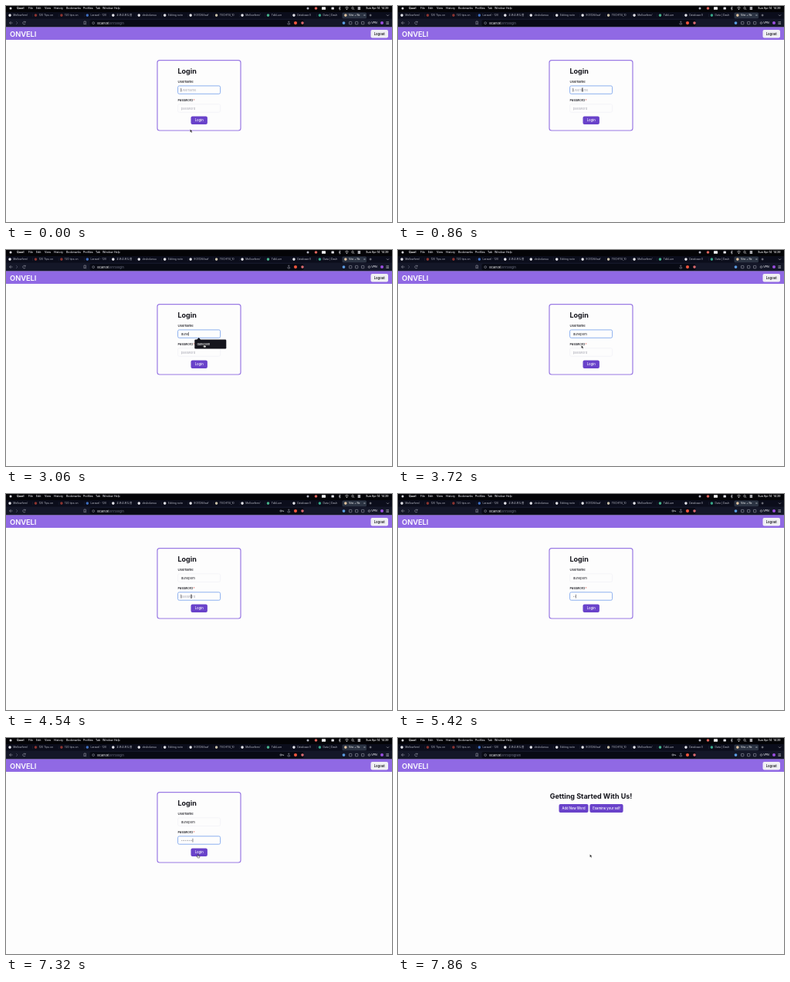
Recreate the animation shown at these times as an HTML page. Size 500x281 px, loop 8 s.

```html
<!DOCTYPE html>
<html lang="en">
<head>
<meta charset="utf-8">
<title>Login</title>
<style>
  html, body { margin: 0; width: 100%; height: 100%; overflow: hidden; background: #fdfdfd; }
  svg { display: block; width: 100vw; height: 100vh; }
  text { font-family: Inter, "Noto Sans CJK JP", "Noto Sans CJK", sans-serif; white-space: pre; }
</style>
</head>
<body>
<svg id="stage" viewBox="0 0 500 281" preserveAspectRatio="none"></svg>
<script>
const LOOP = 8000;
const INK = '#15151c', WHITE = '#fdfdfd', PURPLE = '#6942ca', PLACEHOLDER = '#a9a9b4';
const LIGHT = '#e4e4ea', GREY = '#b4b6c2';
const USER = 'dunepom';
const stage = document.getElementById('stage');

function add(parent, tag, attrs, content) {
  const el = document.createElementNS('http://www.w3.org/2000/svg', tag);
  for (const key in attrs) el.setAttribute(key, attrs[key]);
  if (content !== undefined) el.textContent = content;
  parent.appendChild(el);
  return el;
}
const group = (parent = stage) => add(parent, 'g', {});
const box = (parent, x, y, width, height, fill, more) =>
  add(parent, 'rect', { x, y, width, height, fill, ...more });
const dot = (parent, cx, cy, r, fill) => add(parent, 'circle', { cx, cy, r, fill });
const ring = (parent, cx, cy, r, stroke) =>
  add(parent, 'circle', { cx, cy, r, fill: 'none', stroke, 'stroke-width': 0.5 });
const label = (parent, x, y, size, fill, content, weight = 400, anchor = 'start') =>
  add(parent, 'text', { x, y, fill, 'font-size': size, 'font-weight': weight, 'text-anchor': anchor }, content);
const line = (parent, d, stroke, width = 0.5) =>
  add(parent, 'path', { d, stroke, 'stroke-width': width, fill: 'none' });
const show = (el, on) => el.setAttribute('visibility', on ? 'visible' : 'hidden');

function button(parent, x, y, width, height, content, fill = PURPLE, ink = '#fff', weight = 500) {
  box(parent, x, y, width, height, fill, { rx: 2 });
  label(parent, x + width / 2, y + height / 2 + 1.5, 4.2, ink, content, weight, 'middle');
}

function menuBar() {
  const g = group();
  box(g, 0, 0, 500, 8, '#040407');
  dot(g, 6, 3, 1.5, LIGHT);
  label(g, 14, 4.3, 3.5, '#fff', 'Quorl', 700);
  const items = [['File', 29], ['Edit', 39], ['View', 50], ['History', 62], ['Bookmarks', 78],
    ['Profiles', 100], ['Tab', 116], ['Window', 125], ['Help', 140]];
  for (const [name, x] of items) label(g, x, 4.3, 3.5, LIGHT, name, 500);
  dot(g, 391, 3, 1.5, GREY);
  dot(g, 401.5, 3, 1.8, '#e0655c');
  box(g, 409, 1.2, 5, 3.6, '#fff', { rx: 0.5 });
  box(g, 421.5, 1.4, 3.4, 3.2, LIGHT, { rx: 0.5 });
  line(g, 'M431 2l2.4 2.2-1.2 1V.9l1.2 1L431 4.2', LIGHT);
  line(g, 'M439.3 2.3q2.2-2 4.4 0M440.3 3.5q1.2-1 2.4 0', '#fff', 0.6);
  dot(g, 441.5, 4.6, 0.5, '#fff');
  ring(g, 449, 2.7, 1.3, '#fff');
  line(g, 'M450 3.7l1.2 1.2', '#fff');
  box(g, 455.5, 1.3, 3.8, 1.4, LIGHT, { rx: 0.7 });
  box(g, 455.5, 3.3, 3.8, 1.4, LIGHT, { rx: 0.7 });
  label(g, 495.5, 4.3, 3.5, '#fff', 'Sun Apr 14  14:39', 500, 'end');
}

function tabBar() {
  const g = group();
  box(g, 0, 8, 500, 9, '#0b0d1b');
  box(g, 435.5, 8.6, 31.5, 7.8, '#2b3342', { rx: 1.6 });
  const tabs = [
    ['Mellowfern/', LIGHT], ['120 Tips on', '#8c3530'], ['120 tips on', '#8c3530'],
    ['Laravel - 120', '#3f6fc0'], ['まあまあな書', LIGHT], ['devkolanuu', LIGHT],
    ['Editing note', LIGHT], ['903126/leaf', LIGHT], ['TECH114_10', '#c8c0a8'],
    ['Mellowfern/', LIGHT], ['TalkLum', '#48b48c'], ['Database E', LIGHT],
    ['Data | Dash', '#38a888'], ['Vite + Re', '#e0c4a0']];
  tabs.forEach(([name, color], i) => {
    const x = 5 + i * 33.45;
    dot(g, x, 12.1, 1.8, color);
    label(g, x + 4.2, 13.3, 3.4, i === 13 ? '#fff' : GREY, name);
    if (i && i < 13) box(g, x - 4, 10.2, 0.3, 4, '#30344a');
  });
  line(g, 'M463.4 11l2 2m0-2l-2 2', LIGHT, 0.4);
  line(g, 'M470.6 12h3m-1.5-1.5v3', LIGHT);
  line(g, 'M493 11.4l1.5 1.5 1.5-1.5', LIGHT);
}

function addressBar() {
  const g = group();
  box(g, 0, 16.5, 500, 11.2, '#141728');
  box(g, 108.5, 18, 277, 8.2, '#080a14', { rx: 2 });
  line(g, 'M6.5 20l-2 2 2 2m-2-2h4', GREY);
  line(g, 'M13 20l2 2-2 2', '#6a6e80');
  line(g, 'M25 21a1.8 1.8 0 1 0 .1 2M25.2 19.8v1.4h-1.4', GREY);
  line(g, 'M101 20h2.4v4l-1.2-1-1.2 1z', GREY);
  ring(g, 113.2, 22.2, 1.4, GREY);
  const url = label(g, 118, 23.5, 3.7, '#fff', 'localhost');
  const path = add(url, 'tspan', { fill: '#7d8094' }, '');
  const key = group(g);
  ring(key, 356, 22, 1.1, LIGHT);
  line(key, 'M357 22h2.6v1.1', LIGHT, 0.6);
  line(g, 'M365 22v2h2.6v-2M366.3 23v-3.2l-1 1m1-1l1 1', GREY, 0.45);
  dot(g, 375, 22.1, 2.1, '#f0553c');
  dot(g, 384, 22.1, 1.8, '#d86a70');
  dot(g, 437.5, 22.1, 1.9, '#5b9be0');
  for (const x of [444.5, 452.5, 460.5])
    box(g, x, 20.4, 3.4, 3.4, 'none', { rx: 0.5, stroke: GREY, 'stroke-width': 0.5 });
  ring(g, 470.5, 22.1, 1.3, LIGHT);
  label(g, 473.2, 23.4, 3.5, LIGHT, 'VPN', 500);
  dot(g, 487, 22.1, 2, '#9a4fe0');
  line(g, 'M492.4 20.7h3.6m-3.6 1.4h3.6m-3.6 1.4h3.6', LIGHT);
  return { path, key };
}

function siteHeader() {
  const g = group();
  box(g, 0, 27.5, 500, 16.5, '#9069e4');
  label(g, 5, 39.5, 9.3, '#fff', 'ONVELI', 600);
  button(g, 472.5, 31, 22.5, 10.6, 'Logout', '#f0f0f4', INK, 600);
}

function field(parent, y, hint) {
  const g = group(parent);
  const frame = box(g, 222.6, y, 55, 10.4, WHITE, { rx: 1.8, 'stroke-width': 0.9 });
  return {
    g,
    hint: label(g, 226.8, y + 6.7, 4, PLACEHOLDER, hint),
    caret: box(g, 226.5, y + 2.9, 0.5, 4.8, INK),
    focus(on) { frame.setAttribute('stroke', on ? '#7fa8ee' : '#f3f3f8'); }
  };
}

function loginPage() {
  const g = group();
  box(g, 196, 70.7, 108, 91.3, WHITE, { rx: 3, stroke: '#9a7ae4', 'stroke-width': 1.2 });
  label(g, 222.5, 88, 9, INK, 'Login', 700);
  label(g, 222.5, 100.4, 4.1, INK, 'Username', 500);
  label(g, 222.5, 124.3, 4.1, INK, 'Password', 500);
  label(g, 242.6, 124.3, 4.1, '#e0554c', '*', 500);
  const user = field(g, 103.9, 'Username');
  user.value = label(user.g, 226.8, 110.6, 4, INK, '');
  const pass = field(g, 127.8, 'password');
  pass.dots = Array.from({ length: 9 }, (_, i) => dot(pass.g, 227.6 + i * 1.65, 133.2, 0.45, '#55555e'));
  button(g, 239.5, 143.4, 21.4, 10.7, 'Login');
  const popup = group(g);
  add(popup, 'path', { d: 'M247 117l2.7-3 2.7 3z', fill: '#14141c' });
  box(popup, 244.3, 116.5, 41, 12, '#14141c', { rx: 1.2 });
  label(popup, 247.6, 123.7, 3.7, '#fff', USER, 500);
  return { g, user, pass, popup };
}

function startPage() {
  const g = group();
  label(g, 250, 79.4, 9, INK, 'Getting Started With Us!', 700, 'middle');
  button(g, 208.5, 86, 38, 10.9, 'Add New Word');
  button(g, 248.4, 86, 43.2, 10.9, 'Examine your self');
  return g;
}

menuBar();
tabBar();
const address = addressBar();
siteHeader();
const login = loginPage(), start = startPage();

const mouse = group();
const shapes = {
  arrow: add(mouse, 'path', { d: 'M0 0v3.6l.9-.8.7 1.5.7-.3-.7-1.4h1.2z',
    fill: '#050505', stroke: '#fff', 'stroke-width': 0.25 }),
  beam: line(mouse, 'M-.9-2.3q.9 0 .9.6v3.4q0 .6-.9.6M.9-2.3q-.9 0-.9.6v3.4q0 .6.9.6', INK),
  hand: add(mouse, 'path', { d: 'M-.4 0h.8v1.8l2 .5-.4 2.2h-2.4l-1.3-1.7.5-.4.8.6z',
    fill: '#fff', stroke: '#050505', 'stroke-width': 0.45 })
};

// time, x, y, shape from here on (empty while hidden by typing)
const route = [
  [0, 238.6, 160.6, 'arrow'], [200, 238.6, 157, 'arrow'], [480, 238.6, 116, 'beam'],
  [760, 238.8, 109, 'beam'], [1680, 238.8, 109, ''], [2760, 238.8, 109, 'beam'],
  [2860, 246, 116, 'hand'], [3080, 257, 122.5, 'hand'], [3300, 257, 122.5, 'arrow'],
  [3440, 257, 122.5, 'arrow'], [3720, 237.6, 124.2, 'arrow'], [3860, 238.5, 129, 'beam'],
  [4140, 240, 133.2, 'beam'], [5220, 240, 133.2, ''], [6520, 240, 133.2, 'beam'],
  [6700, 243, 139, 'arrow'], [6820, 246, 145, 'hand'], [7100, 248.6, 151.4, 'hand'],
  [7400, 248.6, 151.4, 'arrow'], [8000, 248.6, 151.4, 'arrow']];
const userKeys = [1700, 1860, 2020, 2180];
const passKeys = Array.from({ length: 9 }, (_, i) => 5220 + i * 142);
const typed = (keys, t) => keys.filter(k => t >= k).length;

function drawMouse(t) {
  let i = route.length - 2;
  while (route[i][0] > t) i--;
  const [t0, x0, y0, shape] = route[i], [t1, x1, y1] = route[i + 1];
  const p = (t - t0) / (t1 - t0), ease = p * p * (3 - 2 * p);
  mouse.setAttribute('transform', `translate(${x0 + (x1 - x0) * ease} ${y0 + (y1 - y0) * ease})`);
  for (const name in shapes) show(shapes[name], name === shape);
}

function render(t) {
  const { user, pass, popup } = login;
  const done = t >= 7400, onPass = t >= 4300;
  login.g.style.display = done ? 'none' : '';
  start.style.display = done ? '' : 'none';
  address.path.textContent = done ? ':5173/program' : ':5173/login';
  show(address.key, onPass);

  const name = t >= 3220 ? USER : USER.slice(0, typed(userKeys, t));
  user.value.textContent = name;
  show(user.hint, !name);
  user.focus(!onPass);
  user.caret.setAttribute('x', 226.6 + (!done && name ? user.value.getComputedTextLength() : 0));
  show(user.caret, t < 3400);
  show(popup, t >= 1740 && t < 3220);

  const count = typed(passKeys, t);
  pass.dots.forEach((d, i) => show(d, i < count));
  show(pass.hint, !count);
  pass.focus(onPass);
  pass.caret.setAttribute('x', 226.6 + count * 1.68);
  show(pass.caret, onPass);
  drawMouse(t);
}

const begin = performance.now();
function tick() {
  render((performance.now() - begin) % LOOP);
  requestAnimationFrame(tick);
}
tick();
</script>
</body>
</html>
```
